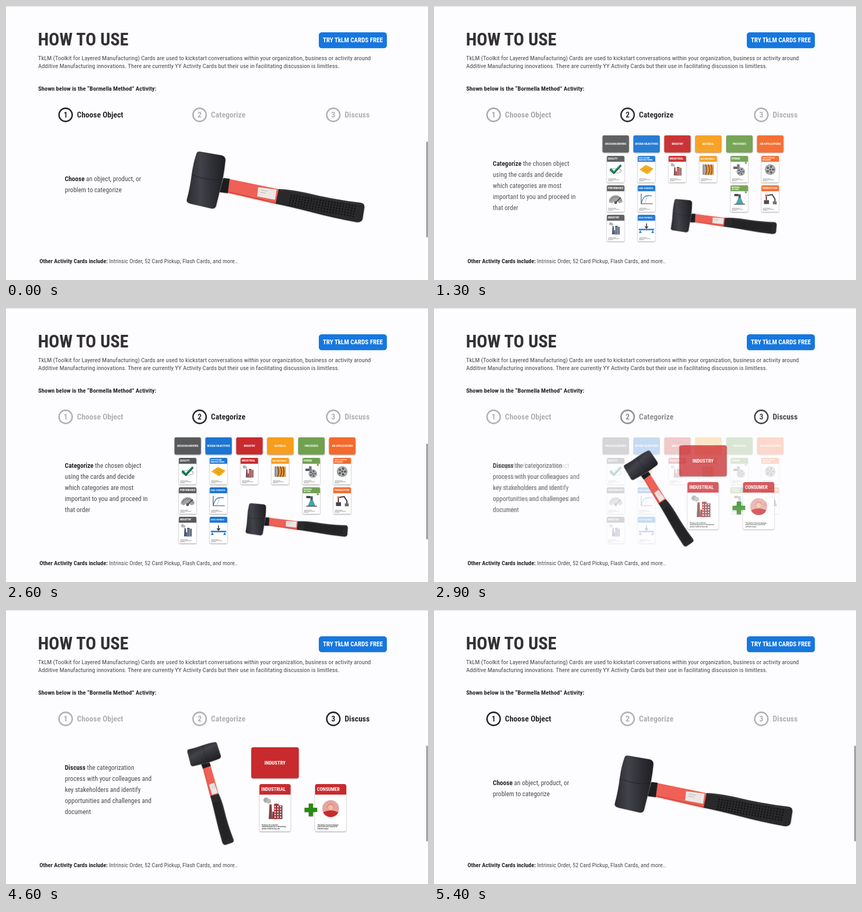
Recreate the animation shown at these times as an HTML page. Size 800 px wide and 521 px high, loop 5500 ms.

```html
<!DOCTYPE html>
<html lang="en">
<head>
<meta charset="utf-8">
<title>How to use</title>
<style>
html, body { margin: 0; height: 100%; overflow: hidden; background: #fdfcfe; }
svg { display: block; width: 100vw; height: 100vh; }
text { font-family: "Roboto Condensed", Roboto, sans-serif; font-stretch: 75%; white-space: pre; }
.bold { font-weight: 700; }
.mid { text-anchor: middle; }
.shadow { filter: drop-shadow(0 1px 1.2px #0006); }
#hammer { filter: drop-shadow(1.5px 1.5px 1.2px #b5a69a80); }
</style>
</head>
<body>
<svg viewBox="0 0 800 521"></svg>
<script>
const svg = document.querySelector('svg');
const INK = '#333135', BODY = '#4a494c', RED = '#c92a2d', GREY = '#58595b',
  BLUE = '#1c75d2', ORANGE = '#f4692b', GREEN = '#70a150', AMBER = '#f99d1c';

let fontScale = 1;
const text = (x, y, size, str, fill = BODY, cls = '') =>
  `<text x="${x}" y="${y}" font-size="${size * fontScale}" fill="${fill}" class="${cls}">${str}</text>`;
const bold = str => `<tspan class="bold" fill="#262529">${str}</tspan>`;
const rect = (x, y, w, h, fill, r = 0) =>
  `<rect x="${x}" y="${y}" width="${w}" height="${h}" rx="${r}" fill="${fill}"/>`;
const disc = (x, y, r, fill) => `<circle cx="${x}" cy="${y}" r="${r}" fill="${fill}"/>`;
const shape = (d, fill) => `<path d="${d}" fill="${fill}"/>`;
const line = (d, stroke, width = 2, extra = '') =>
  `<path d="${d}" fill="none" stroke="${stroke}" stroke-width="${width}" ${extra}/>`;
const range = n => [...Array(n).keys()];
const move = (x, y, s, body) => `<g transform="translate(${x} ${y}) scale(${s})">${body}</g>`;

// Match the heading's size whichever Roboto width is installed.
const heading = () => text(60.5, 74.5, 33.5, 'HOW TO USE', INK, 'bold');
svg.innerHTML = heading();
fontScale = 171.8 / svg.firstChild.getComputedTextLength();

// Card icons, drawn around their own centre.
const factory = (color, dark) =>
  disc(-17, -16, 5, '#a9a9aa') + disc(-12, -14, 4.5, '#bcbcbd') +
  shape('M-12 20L-10.5 -8H-6.5L-5 20Z', dark) + rect(-5, 6, 6, 14, dark) +
  rect(-2, -9, 9, 29, color) + rect(7, -6, 7, 26, dark) + rect(1, -9, 3, 29, dark) +
  range(15).map(i => rect(-1 + i % 3 * 5.2, -5 + (i / 3 | 0) * 5, 2.4, 2.6, '#f6e9e8')).join('');
const wheel = r => disc(0, 0, r, '#8a8c8e') + disc(0, 0, r * .85, '#b4b6b8') +
  range(5).map(i => disc(r * .55 * Math.cos(i * 1.257), r * .55 * Math.sin(i * 1.257), r * .23, '#5a5b5d')).join('') +
  disc(0, 0, r * .2, '#5a5b5d');
const icons = {
  check: `<ellipse rx="19" ry="8" cy="4" fill="none" stroke="#9fa3a6" stroke-width="2"/>` +
    line('M-18 -2L-6 11L18 -15', '#1d4f46', 7) + line('M-17 -4L-6 8L17 -16', '#12a05c', 4),
  gauge: shape('M-23 10A23 23 0 0 1 23 10L12 15A13 11 0 0 0 -12 15Z', '#a2a3a5') +
    line('M-17 5A18 18 0 0 1 17 5', '#6c6d70', 5, 'stroke-dasharray="3 3"') +
    line('M0 12L17 -5', '#333', 3) + disc(0, 12, 5, '#555'),
  lattice: shape('M-24 0L-2 -16L24 -3L3 16Z', '#f3b21d') +
    line('M-16 -5L12 10M-9 -10L18 4M-14 7L10 -10M-5 12L18 -6', '#c98408', 2, 'stroke-dasharray="3 3"'),
  curve: line('M-18 -18V16H21', '#333', 2) + line('M-18 16C-12 -8 -4 -14 18 -11', BLUE, 2.5) + line('M-6 16L4 -12', '#888', 1),
  beam: rect(-26, 1, 52, 5, BLUE) + shape('M-26 15l5 -9l5 9ZM16 15l5 -9l5 9Z', BLUE) +
    line('M0 -17V-3M-5 -7L0 -1L5 -7', '#333', 3),
  swatch: rect(-19, -17, 38, 35, '#e79b3b') + rect(-19, -17, 13, 35, '#a9a9b0') +
    line('M-9 -17Q-2 0 -9 18M0 -17Q9 0 0 18M9 -17Q16 0 9 18', '#8a532a', 4) +
    line('M-16 -17V18', '#70727c', 3, 'stroke-dasharray="3 2"'),
  wheel: wheel(18),
  hybrid: move(5, 7, 1, wheel(14)) + rect(-20, -10, 15, 8, '#55565a') + rect(-8, -18, 9, 15, '#717378') + disc(22, -23, 3.5, GREEN),
  jetting: rect(-17, -17, 14, 7, '#333') + rect(-3, -16, 8, 14, '#4b5964') +
    shape('M-4 -2H6L14 17H-12Z', '#43a3ad') + rect(-17, 16, 36, 3, '#555') + disc(22, -23, 3.5, GREEN),
  robot: rect(-21, 4, 17, 13, '#444') + line('M-13 4V-12L7 -15L16 0V12', '#3d3d40', 4) +
    rect(9, 8, 13, 10, '#6a6a6d') + disc(-13, -12, 4, ORANGE),
  factory: factory(RED, '#7a4648'),
  plant: factory('#2862a8', '#3b4a5c'),
  person: disc(0, 0, 16, '#e5a4a3') + shape('M-14.5 7Q0 0 14.5 7A16 16 0 0 1 -14.5 7Z', RED) +
    disc(0, -3, 6.5, '#d98e73') + disc(0, -2, 5, '#f4c09c'),
};

const filler = ['A short note on this topic', 'and the way it shapes the part that is', 'made and used.'];
function card(x, y, scale, color, title, icon, notes = filler) {
  const rows = title.split('/'), longest = Math.max(...rows.map(r => r.length));
  const size = rows.length > 1 ? Math.min(6.8, 84 / longest) : Math.min(9.2, 92 / longest);
  return move(x, y, scale, rect(0, 0, 59, 90, '#fff', 4) +
    shape('M0 20V4Q0 0 4 0H55Q59 0 59 4V20Z', color) +
    rows.map((r, i) => text(3.5, rows.length > 1 ? 9 + i * 7 : 13.3, size, r, '#fff', 'bold')).join('') +
    move(29.5, 46.5, 1, icons[icon]) +
    notes.map((n, i) => text(4.5, 79 + i * 3.4, 2.6, n, '#333', 'bold')).join(''));
}

const columns = [
  [319.5, GREY, 'DECISION DRIVERS', [['QUALITY', 'check'], ['PERFORMANCE', 'gauge'], ['INDUSTRY', 'plant']]],
  [378, BLUE, 'DESIGN OBJECTIVES', [['HIGH VOLUME/MANUFACTURING', 'lattice'], ['HIGH-STRENGTH', 'curve'], ['HIGH-STIFFNESS', 'beam']]],
  [436.5, RED, 'INDUSTRY', [['INDUSTRIAL', 'factory']]],
  [495, AMBER, 'MATERIAL', [['MULTIMATERIALS', 'swatch']]],
  [554, GREEN, 'PROCESSES', [['HYBRID', 'hybrid'], ['MATERIAL/JETTING', 'jetting']]],
  [612.5, ORANGE, 'AM APPLICATIONS', [['TOUGH-TO-FIND PART/REPLACEMENT', 'wheel'], ['PRODUCTION', 'robot']]],
];
const board = columns.map(([x, color, title, cards]) =>
  rect(x, 246, 50, 32.5, color, 3) + text(x + 25, 264, 5.2, title, '#fff', 'bold mid') +
  cards.map(([name, icon], i) => card(x + 8.3, 285 + i * 56, .56, color, name, icon)).join('')).join('');

const pair = rect(465, 261, 90, 59, RED, 4) + text(510, 293.6, 9.6, 'INDUSTRY', '#fff', 'bold mid') +
  card(480.5, 331, 1, RED, 'INDUSTRIAL', 'factory', ['Businesses rely on industrial',
    'manufacturing processes to efficiently bring', 'products to market at large scale.']) +
  card(586, 331, 1, RED, 'CONSUMER', 'person', ['This industry is focused on leveraging',
    'products and services catered to the', 'individual consumer.']) +
  shape('M574 368h8v8h8v8h-8v8h-8v-8h-8v-8h8Z', '#2a8a12');

const hammer =
  shape('M423 329L518 348.5L512 376.5L419 355Z', '#ef6056') + line('M422 353.5L511 374.5', '#cf4a42', 2) +
  shape('M412 327L424 328.5L420.5 356L405 354Z', '#1d1d20') +
  shape('M361 281Q362 276 369 277L409 284Q416 286 416 293Q413 325 405 353L398 381Q396 386 389 385L350 376Q342 374 342.5 369Q349 345 352 320Q355 298 361 281Z', 'url(#rubber)') +
  line('M353 321Q382 333 411 330', '#1f2025', 1) +
  shape('M478 344.5L513 349L510 368.5L476 362Z', '#ece7e5') + line('M483 350L496 352M482 354L493 356', '#b9b3b1', 1) +
  shape('M517 348Q540 349 568 355Q620 368 672 374Q680 375 679.5 383L676 405Q674 412 664 411Q620 403 575 391Q540 382 511 376Z', '#29292c') +
  line('M519 350Q540 351 568 357Q620 370 674 377', '#3a3a3e', 1.5) +
  range(5).map(i => line(`M${541 - i} ${360 + i * 4.6}Q600 ${370 + i * 4.8} ${667 - i} ${381 + i * 5}`, '#0e0e10', 2.8,
    'stroke-linecap="round" stroke-dasharray="0 5.6"')).join('');

const paragraph = (y, rows) => rows.map((r, i) => text(111.5, y + i * 20.95, 12.55, r)).join('');
const scenes = [
  paragraph(333, [bold('Choose') + ' an object, product, or', 'problem to categorize']),
  paragraph(303.7, [bold('Categorize') + ' the chosen object', 'using the cards and decide',
    'which categories are most', 'important to you and proceed in', 'that order']) + `<g class="shadow">${board}</g>`,
  paragraph(303.7, [bold('Discuss') + ' the categorization', 'process with your colleagues and',
    'key stakeholders and identify', 'opportunities and challenges and', 'document']) + `<g class="shadow">${pair}</g>`,
];
const steps = [[113, 'Choose Object'], [367, 'Categorize'], [620.5, 'Discuss']];

svg.innerHTML = `<defs><linearGradient id="rubber"><stop stop-color="#2a2b31"/><stop offset=".35" stop-color="#42434a"/>
  <stop offset=".65" stop-color="#303137"/><stop offset="1" stop-color="#1e1e22"/></linearGradient></defs>` +
  rect(0, 0, 800, 521, '#fdfcfe') + rect(0, 0, 800, 1.5, '#e6e5e7') +
  `<g id="scrollbar">${rect(797.3, 258, 1.8, 182, '#646367', .9)}</g>` +
  heading() + rect(593, 50, 129, 30.3, '#1677e0', 5.5) +
  text(657.5, 69, 12.15, 'TRY TkLM CARDS FREE', '#fff', 'bold mid') +
  text(60.8, 103.3, 11.78, 'TkLM (Toolkit for Layered Manufacturing) Cards are used to kickstart conversations within your organization, business or activity around') +
  text(61, 117.8, 11.78, 'Additive Manufacturing innovations. There are currently YY Activity Cards but their use in facilitating discussion is limitless.') +
  text(61, 160.5, 11.75, 'Shown below is the “Bormella Method” Activity:', '#262529', 'bold') +
  steps.map(([x, label], i) => `<g class="step"><circle cx="${x}" cy="207" r="12.5" fill="none" stroke="currentColor" stroke-width="2.8"/>` +
    text(x, 212.4, 15, i + 1, 'currentColor', 'bold mid') + text(x + 21.6, 211.8, 15.1, label, 'currentColor', 'bold') + '</g>').join('') +
  text(63.5, 488.5, 11.3, bold('Other Activity Cards include:') + ' Intrinsic Order, 52 Card Pickup, Flash Cards, and more..') +
  scenes.map(s => `<g class="scene">${s}</g>`).join('') + `<g id="hammer">${hammer}</g>`;

const LOOP = 5500, FRAME = 100, FADE = 300;
const switches = [[1050, 1], [2730, 2], [4950, 0]]; // start time, next scene
const poses = [[510.5, 344, 1, 0], [549.4, 403.3, .575, -4.5], [403.5, 345, .58, 62.5]]; // x, y, scale, degrees
const stepNodes = svg.querySelectorAll('.step'), sceneNodes = svg.querySelectorAll('.scene');
const hammerNode = svg.querySelector('#hammer'), scrollbar = svg.querySelector('#scrollbar');

function draw() {
  const t = Math.floor(performance.now() % LOOP / FRAME) * FRAME;
  const [start, next] = switches.filter(s => s[0] <= t).pop() || [-FADE, 0];
  const p = 1 - (1 - Math.min(1, (t - start) / FADE)) ** 1.7;
  const weights = [0, 0, 0];
  weights[next] = p;
  weights[(next + 2) % 3] = 1 - p;

  weights.forEach((w, i) => {
    const v = Math.round(177 - 137 * w);
    stepNodes[i].style.color = `rgb(${v},${v},${v + 1})`;
    sceneNodes[i].style.opacity = w;
  });
  // The scrollbar is gone while a scene changes.
  scrollbar.style.opacity = p < 1 ? 0 : 1;
  const [x, y, scale, angle] = range(4).map(j => poses.reduce((sum, pose, i) => sum + pose[j] * weights[i], 0));
  hammerNode.setAttribute('transform',
    `translate(${x} ${y}) rotate(${angle}) scale(${scale}) translate(${-poses[0][0]} ${-poses[0][1]})`);
  requestAnimationFrame(draw);
}
draw();
</script>
</body>
</html>
```
